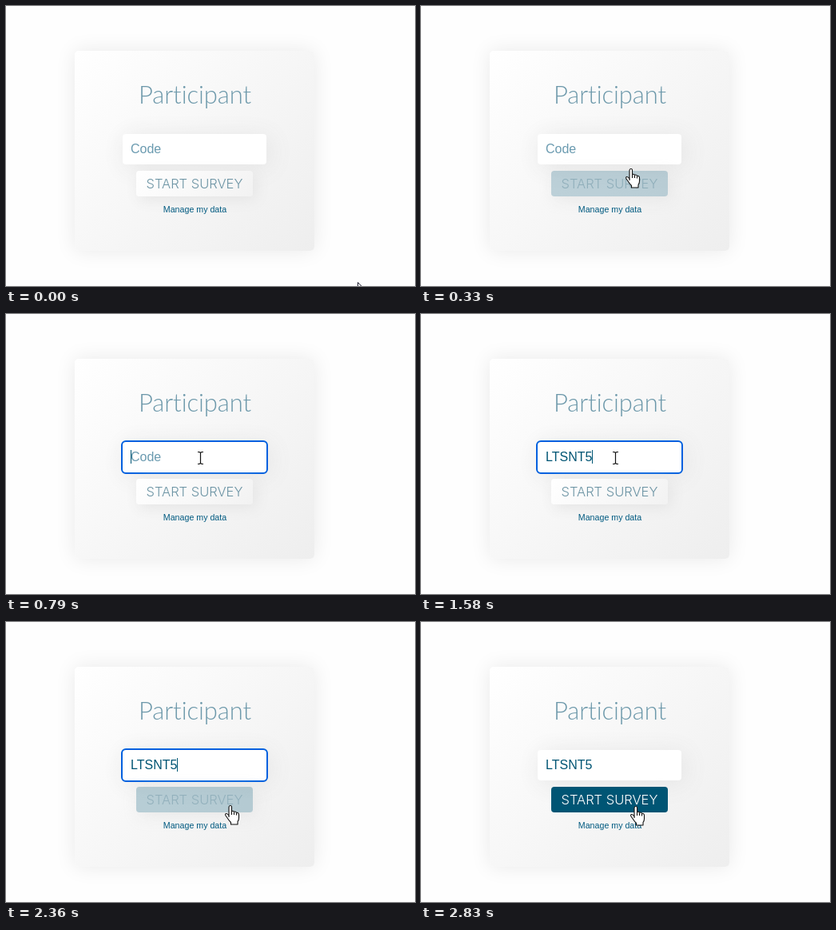
An HTML page that plays this animation: 512x350 px, repeating every 3.02 s.

```html
<!DOCTYPE html>
<html lang="en">
<head>
<meta charset="utf-8">
<title>Participant</title>
<style>
html, body { margin: 0; width: 100%; height: 100%; overflow: hidden; background: #fefefe; }
#stage { position: relative; width: 512px; height: 350px; overflow: hidden; font-family: "Liberation Sans", Arial, sans-serif; }
#stage > * { position: absolute; box-sizing: border-box; white-space: pre; }
#card { left: 86px; top: 56px; width: 300px; height: 250px; border-radius: 5px;
  background: linear-gradient(135deg, #fff, #eee); box-shadow: 0 0 26px #eaeaea; }
#title { left: 86px; top: 90px; width: 301px; text-align: center; font: 300 31px/40px Lato, sans-serif;
  letter-spacing: -.1px; font-variant-ligatures: none; color: #6c98aa; }
#field { left: 146px; top: 160px; width: 180px; height: 38px; border-radius: 4px; padding-left: 10px;
  font-size: 16px; line-height: 37px; background: #fff; box-shadow: 4px 4px 30px #e4e4e4; }
#caret { left: 156px; top: 170px; width: 1px; height: 17px; background: #005574; }
#button { left: 163px; top: 206px; width: 146px; height: 32px; border-radius: 4px; text-align: center;
  font: 300 16.5px/32px Inter, sans-serif; }
#link { left: 86px; top: 246px; width: 301px; text-align: center; font-size: 10.67px; line-height: 16px; color: #005a80; }
#stage > svg { left: 0; top: 0; }
</style>
</head>
<body>
<div id="stage">
  <div id="card"></div>
  <div id="title">Participant</div>
  <div id="field"></div>
  <div id="caret"></div>
  <div id="button">START SURVEY</div>
  <div id="link">Manage my data</div>
  <svg width="512" height="350" stroke-linejoin="round">
    <path id="arrow" d="M.5.5V16.5L4.2 13 6.7 18.5 9 17.5 6.6 12H11.5Z" fill="#fff" stroke="#223"/>
    <g id="hand" fill="#fff" stroke="#111" stroke-width="1.1">
      <path d="M5 2.5Q5 .5 6.8 .5T8.5 2.5V7.5Q10.5 6.8 11.5 8.3Q13.5 7.5 14.5 9.3Q17.5 9 17.5 12V16Q17.5 18.5 16 20.5V24H7.5V21.5Q5 19 3.5 16.5L1 13Q0 11 1.5 10.5Q3 10 5 13Z"/>
      <path d="M5 13V15M8.5 7.5V12M11.5 8.5V12M14.5 9.5V12.5"/>
    </g>
    <path id="beam" d="M-3 -7.5H-1L.5 -6.5 2 -7.5H4M-3 7.5H-1L.5 6.5 2 7.5H4M.5 -6.5V6.5" fill="none" stroke="#111" stroke-width="1.2"/>
  </svg>
</div>
<script>
const LOOP = 3020;
const $ = id => document.getElementById(id);

// Each step holds: time, pointer shape, x, y, button hover amount
const steps = [
  [0, "arrow", 440, 345, 0], [70, "arrow", 425, 334, 0], [130, "arrow", 382, 300, 0],
  [200, "arrow", 322, 254, 0], [270, "hand", 272, 219, .14], [330, "hand", 256, 203, .24],
  [400, "beam", 252, 192, .14], [460, "beam", 247, 186, .05], [530, "beam", 244, 182, 0],
  [590, "beam", 243, 180, 0], [2170, "beam", 246, 184, 0], [2230, "beam", 256, 194, 0],
  [2300, "hand", 268, 218, .1], [2360, "hand", 274, 229, .26], [2430, "hand", 267, 230, .6],
  [2500, "hand", 262, 230, 1]
];
const mix = (a, b, p) => `rgb(${a.map((v, i) => v + (b[i] - v) * p)})`;
const within = (t, a, b) => t >= a && t < b;

function draw(now) {
  const t = now % LOOP;
  const [, shape, x, y, p] = steps.findLast(s => s[0] <= t);
  for (const id of ["arrow", "hand", "beam"]) {
    $(id).style.display = id === shape ? "" : "none";
    $(id).setAttribute("transform", `translate(${x} ${y})`);
  }

  const typed = t >= 1580;
  $("field").textContent = typed ? "LTSNT5" : "Code";
  $("field").style.color = typed ? "#005574" : "#6b9bb0";
  $("field").style.outline = within(t, 720, 2760) ? "2px solid #0060df" : "none";
  $("caret").style.left = typed ? "214px" : "156px";
  const caretOn = within(t, 720, 1250) || within(t, 1580, 1770) || within(t, 2100, 2760);
  $("caret").style.display = caretOn ? "" : "none";

  const b = $("button").style;
  b.background = p ? `rgba(0,85,116,${p})` : "linear-gradient(135deg, #fff, #f2f2f2)";
  b.boxShadow = `4px 4px 18px rgba(228,228,228,${1 - p})`;
  b.color = mix([108, 148, 164], [255, 255, 255], p);
  requestAnimationFrame(() => draw(performance.now() - start));
}
const start = performance.now();
draw(0);
</script>
</body>
</html>
```
